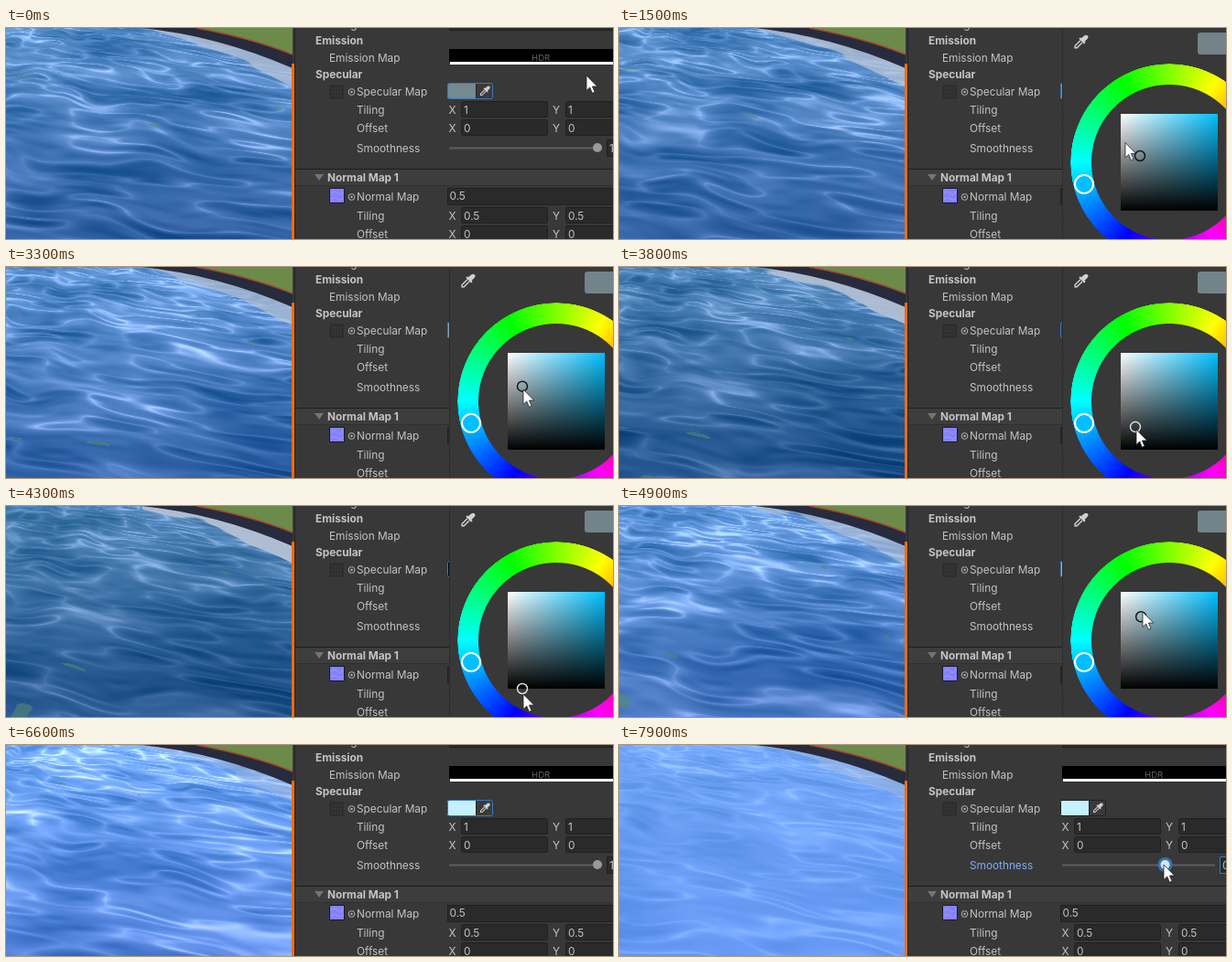
Write an HTML page with a canvas that moves like this. It is 663 by 231 pixels and loops after 8 s.

```html
<!DOCTYPE html>
<html lang="en">
<head>
<meta charset="utf-8">
<title>Water material inspector</title>
<style>
html, body { margin: 0; width: 100%; height: 100%; overflow: hidden; background: #383838; }
#stage { position: relative; width: 663px; height: 231px; overflow: hidden; }
#stage > * { position: absolute; left: 0; top: 0; }
text { font: 11.8px Inter, sans-serif; fill: #c4c4c4; }
.b { font-weight: 700; }
.field { fill: #2a2a2a; stroke: #202020; }
#picker { left: 485px; width: 178px; height: 231px; background: #383838; box-shadow: -1px 0 #2c2c2c; }
#picker > * { position: absolute; }
#wheel {
  left: 8px; top: 39px; width: 216px; height: 216px; border-radius: 50%;
  background: conic-gradient(from 90deg, #f00, #f0f, #00f, #0ff, #0f0, #ff0, #f00);
  mask: radial-gradient(circle, transparent 84.5px, #000 85.5px, #000 107.5px, transparent 108px);
}
#shade {
  left: 63px; top: 94px; width: 106px; height: 106px;
  background: linear-gradient(to top, #000, transparent), linear-gradient(to right, #fff, hsl(195 100% 50%));
}
#old { left: 147px; top: 5px; width: 40px; height: 24px; border-radius: 3px; background: #728389; }
</style>
</head>
<body>
<div id="stage">
  <canvas id="water" width="313" height="231"></canvas>

  <svg width="663" height="231">
    <defs>
      <g id="dropper">
        <path d="M10 2.5Q13-.5 15 1.3T13.5 6L12 7.5l1 1L11.5 10 6 4.5 7.5 3l1 1z" fill="#d0d0d0"/>
        <path d="M7.5 6.5 2 12v2h2l5.5-5.5" fill="none" stroke="#d0d0d0" stroke-width="1.4"/>
      </g>
      <g id="target">
        <circle r="3.4" fill="none" stroke="#b4b4b4"/><circle r="1.2" fill="#b4b4b4"/>
      </g>
    </defs>

    <path d="M148 0Q230.500 8.250 313 44V0z" fill="#282b3d"/>
    <path d="M208 0Q268 11 313 29V0z" fill="#6c8a4a"/>
    <path d="M208 0Q268 11 313 29" fill="none" stroke="#a3472e" stroke-width="1.500"/>
    <path d="M313.500 39V231" stroke="#f56b12" stroke-width="3"/>

    <path d="M315 0H663V231H315z" fill="#383838"/>
    <path d="M315.500 0V231" stroke="#242424"/>
    <path d="M316 154.500H663" stroke="#1e1e1e"/>
    <path d="M316 155H663V172H316z" fill="#3d3d3d"/>
    <path d="M316 172.500H663" stroke="#303030"/>
    <path d="M337 160h10l-5 7z" fill="#747474"/>

    <text x="353" y="0">Tiling</text>
    <text class="b" x="338" y="18">Emission</text>
    <text x="353" y="37">Emission Map</text>
    <text class="b" x="338" y="55">Specular</text>
    <text x="383" y="74">Specular Map</text>
    <text x="383" y="94">Tiling</text>
    <text x="383" y="114">Offset</text>
    <text x="383" y="136" id="smoothLabel">Smoothness</text>
    <text class="b" x="351" y="168">Normal Map 1</text>
    <text x="383" y="189">Normal Map</text>
    <text x="383" y="210">Tiling</text>
    <text x="383" y="230">Offset</text>

    <path d="M354 63h14v14h-14z" fill="#303030" stroke="#292929"/>
    <path d="M356 66h10M356 70h10M356 74h10" stroke="#444" stroke-dasharray="1 2"/>
    <path d="M353.500 175.500h16v16h-16z" fill="#8482fa" stroke="#17172e"/>
    <path d="M355 181q4-4 7 0t6-2M355 187q4-3 7 0t6-1" fill="none" stroke="#a09bff"/>
    <use href="#target" x="377.500" y="70"/>
    <use href="#target" x="377.500" y="185"/>

    <path class="field" d="M484.500-10H670V2.500H484.500z"/>
    <path d="M484 23H663V37H484z" fill="#000"/>
    <path d="M485 37H663V40H485z" fill="#fff"/>
    <text x="574" y="36" style="font-size:9.600px;fill:#666">HDR</text>

    <path class="field" d="M482.500 175.500H670V193.500H482.500z"/>
    <text x="484.500" y="188">0.5</text>
    <g id="vectors"></g>

    <path id="swatch" d="M482 61H513V77H482z"/>
    <path d="M513 61h18v16H513z" fill="#3a3a3a"/>
    <path d="M513.500 61v16" stroke="#232323"/>
    <rect id="focus" x="482.500" y="60.500" width="49" height="17" rx="2" fill="none"/>
    <use href="#dropper" transform="translate(517 63) scale(.75)"/>

    <path d="M484 131.500H651" stroke="#5e5e5e" stroke-width="2"/>
    <circle id="halo" cy="131" r="8" fill="#3a72b0"/>
    <circle id="knob" cy="131" r="5"/>
    <path id="valueBox" class="field" d="M656.500 122.500H670V140.500H656.500z"/>
    <text id="value" x="659" y="136"></text>
  </svg>

  <div id="picker">
    <div id="old"></div>
    <div id="wheel"></div>
    <div id="shade"></div>
    <svg width="178" height="231" viewBox="485 0 178 231" style="left:0;top:0">
      <use href="#dropper" transform="translate(496 7) scale(1.05)"/>
      <circle cx="508" cy="171" r="10" fill="#00c0ff" stroke="#fff" stroke-width="2"/>
      <circle id="ring" r="5.500" fill="none" stroke-width="1.500"/>
    </svg>
  </div>

  <svg width="663" height="231">
    <path id="cursor" d="M0 0V16.500l3.700-3.500 2.700 6.300 2.700-1.200-2.700-6.100h5.300z" fill="#fff" stroke="#222" stroke-width=".8"/>
  </svg>
</div>

<script>
const LOOP = 8000, STEP = 100;
const $ = id => document.getElementById(id);
const clamp = (v, lo, hi) => Math.min(hi, Math.max(lo, v));
const mix = (a, b, k) => a + (b - a) * k;

// Spans in which the screen repaints; the picture holds in between.
const pointerSpans = [[0, 0], [100, 100], [300, 400], [1100, 1600]];
const sceneSpans = [[0, 0], [700, 800], [1800, 2600], [3000, 3800], [3900, 4700],
  [4800, 5400], [5900, 5900], [6600, 6600], [6900, 7500], [7700, 7900]];
const allSpans = [...pointerSpans, ...sceneSpans].sort((a, b) => a[0] - b[0]);

function held(t, spans) {
  const [, end] = spans.filter(s => s[0] <= t).pop();
  return Math.min(Math.floor(t / STEP) * STEP, end);
}

// Pointer path: time, x, y
const path = [
  [0, 634, 52], [100, 461, 81], [300, 480, 72], [400, 493, 68], [1000, 493, 68],
  [1600, 565, 137], [1700, 565, 137], [2400, 565, 99], [2900, 565, 98], [3000, 565, 104],
  [3300, 565, 134], [3800, 565, 178], [4300, 565, 206], [4400, 565, 204], [4700, 567, 148],
  [4900, 572, 116], [5100, 573, 97], [5400, 573, 94], [6600, 573, 94], [6800, 645, 131],
  [7500, 606, 131], [7900, 595, 131]
];
function pointer(t) {
  const i = path.findIndex(p => p[0] >= t);
  if (i < 1) return path[i < 0 ? path.length - 1 : 0].slice(1);
  const a = path[i - 1], b = path[i], k = (t - a[0]) / (b[0] - a[0]);
  return [mix(a[1], b[1], k), mix(a[2], b[2], k)];
}

// The picked colour trails the pointer slightly.
function picked(t) {
  const [x, y] = t < 1800 ? [570, 140] : pointer(Math.min(t, 5900) - 33);
  return { x: clamp(x - 1, 548, 654), y: clamp(y, 94, 200) };
}
const value = p => 1 - (p.y - 94) / 106;
function rgb(p) {
  const v = 255 * value(p), s = (p.x - 548) / 106;
  return `rgb(${v * (1 - s)},${v * (1 - s * .25)},${v})`;
}
const knobX = t => t < 6900 ? 646 : pointer(t)[0] + 1.5;

// Tileable value noise
const lattice = new Float32Array(4096);
let seed = 77;
for (let i = 0; i < 4096; i++) {
  seed = (seed * 1664525 + 1013904223) >>> 0;
  lattice[i] = seed / 4294967296;
}
function noise(u, v) {
  const i = Math.floor(u), j = Math.floor(v);
  let a = u - i, b = v - j;
  a *= a * (3 - 2 * a);
  b *= b * (3 - 2 * b);
  const at = (x, y) => lattice[(x & 63) + ((y & 63) << 6)];
  return mix(mix(at(i, j), at(i + 1, j), a), mix(at(i, j + 1), at(i + 1, j + 1), a), b);
}

const ctx = $("water").getContext("2d");
const W = 313, H = 231, img = ctx.createImageData(W, H);

function drawWater(t) {
  const light = value(picked(t)), gain = light * light;
  const rough = clamp((646 - knobX(t)) / 49, 0, 1);
  const amp = mix(75 + 35 * light, 42, rough);
  const foam = .95 - .55 * gain, T = t / 1000;
  for (let y = 0, p = 0; y < H; y++) {
    const d = y / H;
    const base = [
      mix(mix(68, 38, d) + 44 * gain, mix(112, 98, d), rough),
      mix(mix(124, 86, d) + 44 * gain, mix(165, 150, d), rough),
      mix(mix(174, 142, d) + 76 * gain, mix(247, 240, d), rough)
    ];
    for (let x = 0; x < W; x++, p += 4) {
      const u = (x - 100) * 4 / (y + 70) + 20;
      const flow = 18 * Math.log(y - .13 * x + 72);
      const v = flow + 1.6 * noise(u * .9 + T * .4, flow * .35 + T);
      const big = noise(u * .5 + T * .5, v * .4 + T * .7);
      const mid = noise(u * .9 - T * .4, v * 1.3 + T * 1.3);
      const fine = noise(u * 2 + T, v * 2.6 - T * .8);
      const crest = (1 - Math.abs(2 * mid - 1)) ** 3;
      const n = big * .42 + mid * .14 + crest * .28 + fine * .2 - .46;
      const h = n * amp * 1.4 + Math.max(0, n - .14) * amp * 1.6;
      let r = base[0] + h, g = base[1] + h * .85, b = base[2] + h * .85;

      if (noise(u * 1.4 + T * .6 + 9, v * .8 + T + 31) > .955 && fine > .35) {
        const k = .6 - .5 * rough;
        r = mix(r, 80, k);
        g = mix(g, 135, k);
        b = mix(b, 115, k);
      }
      const e = x - 148, bank = e * e * .001 + e * .1;
      const reach = (x - 150) * .11 + (big - .5) * 9;
      const f = e > 0 ? clamp(bank + reach - y, 0, 1) * foam : 0;
      img.data[p] = mix(r, 180, f);
      img.data[p + 1] = mix(g, 192, f);
      img.data[p + 2] = mix(b, 212, f);
      img.data[p + 3] = 255;
    }
  }
  ctx.putImageData(img, 0, 0);
}

function set(id, attrs) {
  for (const k in attrs) $(id).setAttribute(k, attrs[k]);
}

function drawUi(t) {
  const [x, y] = pointer(t), p = picked(t), kx = knobX(t), sliding = t >= 6900;
  const shown = t < 6600 || sliding;
  set("cursor", { transform: `translate(${x} ${y})`, visibility: shown ? "visible" : "hidden" });
  set("ring", { cx: p.x, cy: p.y, stroke: p.y > 165 ? "#ddd" : "#151515" });
  set("swatch", { fill: rgb(p) });
  set("focus", { stroke: sliding ? "#202020" : "#3a79bb" });
  set("knob", { cx: kx, fill: sliding ? "#d8e4f2" : "#999" });
  set("halo", { cx: kx, visibility: sliding ? "visible" : "hidden" });
  $("smoothLabel").style.fill = sliding ? "#7baefa" : "";
  $("valueBox").style.stroke = sliding ? "#3a79bb" : "";
  $("value").textContent = kx < 645 ? ((kx - 484) / 162).toFixed(2) : "1";
  $("picker").style.display = t >= 700 && t < 6600 ? "" : "none";
}

const vectorRow = (y, n) => [["X", 483.5, 497], ["Y", 597, 611]].map(([axis, tx, fx]) =>
  `<text x="${tx}" y="${y + 4}">${axis}</text>
   <rect class="field" x="${fx + .5}" y="${y - 9.5}" width="94" height="17" rx="2"/>
   <text x="${fx + 3}" y="${y + 4}">${n}</text>`).join("");
$("vectors").innerHTML =
  vectorRow(90, 1) + vectorRow(110, 0) + vectorRow(206, .5) + vectorRow(226, 0);

let lastUi = -1, lastScene = -1;
const start = performance.now();
function frame() {
  const t = (performance.now() - start) % LOOP;
  const ui = held(t, allSpans), scene = held(t, sceneSpans);
  if (ui !== lastUi) drawUi(lastUi = ui);
  if (scene !== lastScene) drawWater(lastScene = scene);
  requestAnimationFrame(frame);
}
frame();
</script>
</body>
</html>
```
